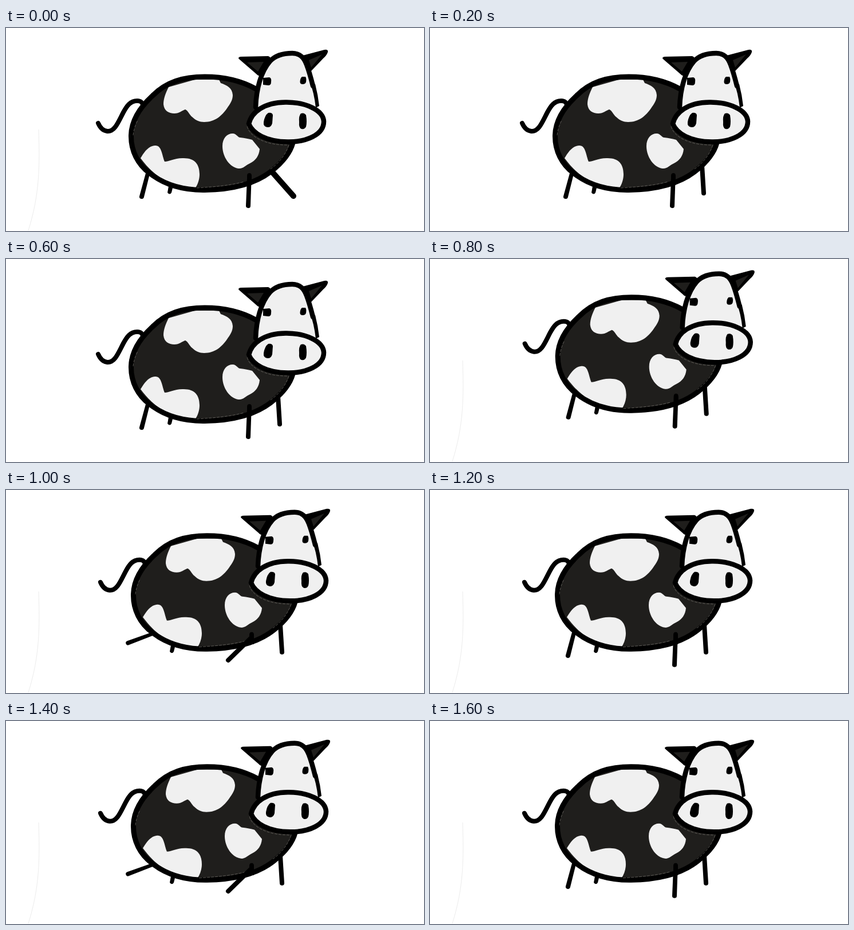
Write an HTML page that moves like this. It is 730 by 354 pixels and loops after 1.8 s.

```html
<!DOCTYPE html>
<html lang="en">
<head>
<meta charset="utf-8">
<title>Dancing cow</title>
<style>
  html, body { margin: 0; width: 100%; height: 100%; overflow: hidden; background: #fff; }
  svg { display: block; width: 730px; height: 354px; }
  .ink { fill: none; stroke: #000; stroke-linecap: round; stroke-linejoin: round; }
  .dark { fill: #1f1e1c; }
  .pale { fill: #f0f0f0; }
  .hair { fill: none; stroke: #77756f; stroke-width: .7; stroke-dasharray: 5 2; }
</style>
</head>
<body>
<svg viewBox="0 0 730 354">
  <path id="arc" d="M57 177C59 240 59 290 39 353" fill="none" stroke="#ececec"/>
  <g id="cow">
    <path class="ink" stroke-width="8" d="M240 138C239 130 236 127 229 127C217 127 211 136 205 147C196 164 190 181 177 180C168 179 164 173 161 166"/>
    <path id="rear"/>
    <path d="M284 276L291 279L289 287Q286 292 282 287Z"/>
    <path id="far"/>

    <path class="dark" d="M436 106C409 91 379 85 347 85C309 85 280 94 256 118C232 140 219 164 218.500 187C218 214 230 238 252 254C279 275 310 283 347 282.500C389 282 432 274 463 250C482 235 496 219 501 200L470 150Z"/>
    <g class="pale">
      <path d="M284 103C279 113 275 123 275 133C276 144 284 149 294 149C303 149 307 144 313 142C318 144 320 151 325 155C331 161 338 164 346 164C365 164 377 153 386 140C391 133 396 126 396 117C395 104 386 100 375 96L372 90L330 90Z"/>
      <path d="M235 227C241 217 248 206 260 205C272 204 272 221 277 233C286 233 293 227 308 227C329 226 338 237 338 255C338 264 335 273 330 280C292 279 262 263 235 227Z"/>
      <path d="M378 206C378 192 386 184 396 184C402 184 405 191 409 191C417 192 424 193 430 195L443 211C442 223 436 231 426 236C419 239 414 246 406 245C391 243 378 225 378 206Z"/>
    </g>
    <path class="ink" stroke-width="9" d="M436 106C409 91 379 85 347 85C309 85 280 94 256 118C232 140 219 164 218.500 187C218 214 230 238 252 254C279 275 310 283 347 282.500C389 282 432 274 463 250C482 235 496 219 501 200"/>
    <path class="hair" d="M494 204C488 222 476 236 462 246M333 279C362 277 390 275 416 268M222 187C223 178 226 168 230 161M424 158C416 170 424 185 442 194C458 202 475 204 492 204"/>
    <path d="M421 258Q421 253 425 253Q429 253 429 258L429 274L421 274Z"/>
    <path id="near"/>

    <path d="M406 53Q406 50 411 50L458 49Q464 51 460 56L444 82Q441 85 437 80L408 55Z"/>
    <path class="dark" d="M421 60L450 59L440 76Z"/>
    <path d="M518 48L556 38Q563 37 562 42Q560 48 554 53L533 75Z"/>
    <path class="dark" d="M529 56L552 46L533 69Z"/>
    <path class="pale" d="M436 140C437 107 445 76 461 58C471 47 487 44 500 44C513 44 520 51 525 64C534 86 539 113 543 142Z"/>
    <path class="ink" stroke-width="8.500" d="M436 138C437 107 445 76 461 58C471 47 487 44 500 44C513 44 520 51 525 64C530 77 533 89 536 101"/>
    <path d="M530 92L540 98Q545 117 547 136L541 139Q538 112 530 92Z"/>
    <path class="pale ink" style="fill:#f0f0f0" stroke-width="8.500" d="M424 167C429 146 451 130 488 129.500C523 129 554 143 555 163C555 186 525 199 492 198.500C454 198 431 184 424 167Z"/>
    <path d="M449 87L460 86Q464 87 463 94Q463 100 458 100L449 99Z"/>
    <path d="M517 85L523 85Q525 88 524 94Q523 98 518 98Q513 98 513.500 93Q514 87 517 85Z"/>
    <path d="M458 148Q465 147 466 152L465 166Q463 174 456 173Q449 172 450 164Q452 152 458 148Z"/>
    <path d="M515 149Q521 147 524 152Q526 164 524 172Q522 177 516 176Q511 174 512 164Q511 153 515 149Z"/>
  </g>
</svg>
<script>
const $ = id => document.getElementById(id);
const STEP = 200;

// Tapered limb with a rounded foot: top point, foot point, half widths.
function limb(x1, y1, x2, y2, w1, w2) {
  const len = Math.hypot(x2 - x1, y2 - y1);
  const nx = (y1 - y2) / len, ny = (x2 - x1) / len;
  const p = (x, y, w) => (x + nx * w) + " " + (y + ny * w);
  return `M${p(x1, y1, w1)}L${p(x2, y2, w2)}A${w2} ${w2} 0 0 0 ${p(x2, y2, -w2)}L${p(x1, y1, -w1)}Z`;
}

const legs = {
  rear: [limb(248, 252, 237, 294, 3.5, 4), limb(252, 256, 209, 272, 3, 3.8)],
  near: [limb(425, 258, 423, 310, 3.8, 4), limb(424, 263, 384, 302, 4, 4)],
  far: [limb(475, 240, 478, 288, 4, 4), limb(463, 249, 502, 293, 5, 5)]
};

function draw(ms) {
  const beat = Math.floor(ms / STEP) % 9;
  const intro = beat < 4, hop = beat === 4;
  const [x, y] = intro ? [0, 0] : hop ? [4.7, -18.3] : [4, -5.2];
  const kick = beat === 5 || beat === 7;
  $("cow").setAttribute("transform", `translate(${x} ${y})`);
  $("far").setAttribute("d", legs.far[+(intro && beat % 2 === 0)]);
  $("rear").setAttribute("d", legs.rear[+kick]);
  $("near").setAttribute("d", legs.near[+kick]);
  $("arc").style.display = intro && beat % 2 ? "none" : "";
}

const start = performance.now();
function tick() {
  draw(performance.now() - start);
  requestAnimationFrame(tick);
}
draw(0);
requestAnimationFrame(tick);
</script>
</body>
</html>
```
